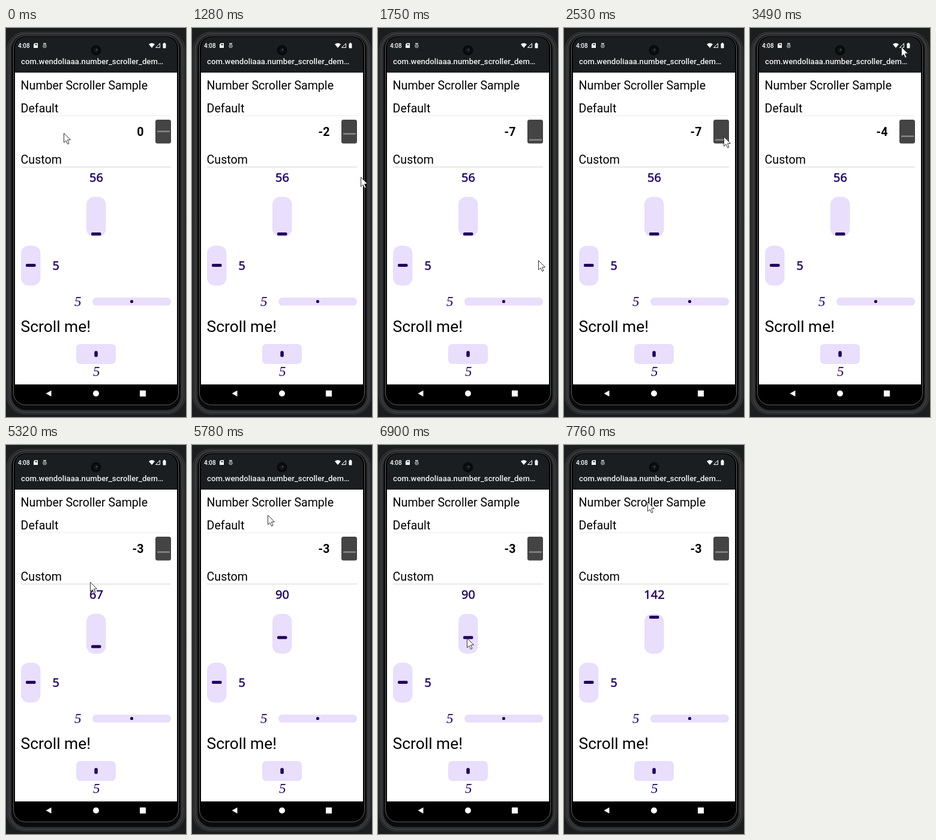
Write an HTML page with a canvas that moves like this. It is 300 px wide and 645 px high and loops after 8000 ms.

```html
<!DOCTYPE html>
<html lang="en">
<head>
<meta charset="utf-8">
<title>Number Scroller</title>
<style>
  html, body { margin: 0; width: 100%; height: 100%; overflow: hidden; background: #1c1d1e; }
  canvas { display: block; }
</style>
</head>
<body>
<canvas id="stage" width="300" height="645"></canvas>
<script>
const ctx = document.getElementById('stage').getContext('2d');
const LOOP = 8000;
const PURPLE = '#21005d', LILAC = '#e9defc', BAR = '#1b1e20';
const ROBOTO = 'Roboto, sans-serif';

// Pointer moves; `drag` names the value it changes and by how much.
const moves = [
  { start: 90, end: 470, steps: 6, from: [96, 174], to: [255, 164] },
  { start: 980, end: 1750, steps: 11, from: [255, 164], via: [303, 246], to: [267, 385], drag: ['plain', -7] },
  { start: 2070, end: 2530, steps: 7, from: [267, 385], to: [266, 180] },
  { start: 2950, end: 3570, steps: 9, from: [266, 180], to: [251, 21], drag: ['plain', 4] },
  { start: 3890, end: 3980, steps: 2, from: [251, 21], to: [186, 222] },
  { start: 4220, end: 4600, steps: 6, from: [186, 222], to: [148, 292] },
  { start: 5090, end: 5780, steps: 10, from: [148, 292], to: [126, 116], drag: ['custom', 34] },
  { start: 6100, end: 6500, steps: 6, from: [126, 116], to: [148, 332] },
  { start: 6900, end: 7690, steps: 11, from: [148, 332], to: [138, 93], drag: ['custom', 52] },
  { start: 7760, end: 7760, steps: 1, from: [138, 93], to: [139, 94] }
];

const ease = p => 0.3 * (1 - Math.cos(Math.PI * p)) + 0.4 * p;

function along({ from, via, to }, s) {
  return from.map((a, i) => {
    const mid = via ? via[i] : (a + to[i]) / 2;
    return (1 - s) ** 2 * a + 2 * s * (1 - s) * mid + s * s * to[i];
  });
}

function stateAt(t) {
  const state = { pointer: moves[0].from, plain: 0, custom: 56 };
  for (const move of moves) {
    if (t < move.start) break;
    const interval = (move.end - move.start) / (move.steps - 1) || 1;
    // Steps land on a 10 ms clock, so allow a slightly early one.
    const step = Math.min(move.steps, Math.floor((t - move.start) / interval + 0.12) + 1);
    state.pointer = along(move, ease(step / move.steps));
    if (move.drag) {
      const [key, delta] = move.drag;
      const travel = (state.pointer[1] - move.from[1]) / (move.to[1] - move.from[1]);
      const amount = Math.max(0, (travel - 0.06) / 0.94);
      state[key] += Math.sign(delta) * Math.floor(Math.abs(delta) * amount + 1e-6);
    }
  }
  return state;
}

function box(x, y, w, h, r, color) {
  ctx.fillStyle = color;
  ctx.beginPath();
  ctx.roundRect(x, y, w, h, r);
  ctx.fill();
}

function disc(x, y, r, color) {
  ctx.fillStyle = color;
  ctx.beginPath();
  ctx.arc(x, y, r, 0, 2 * Math.PI);
  ctx.fill();
}

function poly(color, ...points) {
  ctx.fillStyle = color;
  ctx.beginPath();
  points.forEach(([x, y]) => ctx.lineTo(x, y));
  ctx.closePath();
  ctx.fill();
}

function outline(color, width = 1) {
  ctx.strokeStyle = color;
  ctx.lineWidth = width;
  ctx.stroke();
}

function label(text, x, y, font, color = '#000', align = 'left') {
  ctx.font = font;
  ctx.fillStyle = color;
  ctx.textAlign = align;
  ctx.fillText(text, x, y);
}

// Regular digits thickened to a medium weight.
function digits(value, x, y) {
  label(value, x, y, '20px "Noto Sans", sans-serif', PURPLE, 'center');
  ctx.strokeStyle = PURPLE;
  ctx.lineWidth = 0.5;
  ctx.strokeText(value, x, y);
}

function drawPhone() {
  box(0, 0, 300, 645, 0, '#1c1d1e');
  box(2, 7, 296, 633, 29, '#242526');
  outline('#3f4041');
  box(5, 9.5, 290, 628, 27, '#303132');
  outline('#4b4c4d');
  box(9, 11.5, 282, 622, 24, '#0b0b0b');
  box(12.5, 13, 275, 612, 20, '#000');
  outline('#5e5f60');
  box(15, 15, 270, 607, 18, '#000');
  box(15, 15, 270, 59, [18, 18, 0, 0], BAR);
  box(15, 74, 270, 517, 0, '#fff');
}

function drawStatusBar() {
  label('4:08', 20, 33, '500 10px ' + ROBOTO, '#fff');
  poly('#fff', [48, 25], [53, 25], [53, 33], [46, 33], [46, 27]);
  box(48.5, 26.5, 3, 2, 0, BAR);

  box(62, 25, 5, 1.5, 0, '#ddd');
  disc(64.5, 30, 2.7, BAR);
  outline('#ddd');
  disc(64.5, 30, 1, '#ddd');

  disc(150, 37, 8.5, '#090a0b');
  disc(150, 37, 4, '#14171a');
  disc(151, 36, 1.2, '#4a5054');

  poly('#fff', [238, 27], [240.5, 25.5], [243, 25], [245.5, 25.5], [248, 27], [243, 33]);
  poly(BAR, [256.5, 25.5], [256.5, 32.5], [249.5, 32.5]);
  outline('#fff');
  box(261.5, 25.5, 5, 8, 1, '#fff');
  box(263, 24.5, 2, 1.5, 0, '#fff');
  label('com.wendoliaaa.number_scroller_dem…', 25, 60, '500 13.2px ' + ROBOTO, '#f1f1f1');
}

function drawNavigation() {
  poly('#fff', [66.5, 606], [75.5, 601], [75.5, 611]);
  disc(150, 606, 5, '#fff');
  box(223, 601, 10, 10, 0.5, '#fff');
}

function drawContent({ plain, custom }) {
  const heading = '19.6px ' + ROBOTO;
  const italic = 'italic 23px "Liberation Serif", serif';

  label('Number Scroller Sample', 24.6, 102, heading);
  label('Default', 24.6, 140, heading);
  box(25, 145, 250, 1, 0, '#ebebeb');
  label(plain, 229.5, 179, 'bold 19.7px ' + ROBOTO, '#000', 'right');
  box(249, 152, 26, 39.5, 3.5, '#444');
  box(252, 170.2 - 2 * plain, 21, 2.5, 0.5, '#888');

  label('Custom', 24.6, 225, heading);
  box(25, 230, 250, 1, 0, '#d5d5d5');
  digits(custom, 150.5, 255);
  box(134, 280, 32.5, 66, 13, LILAC);
  box(142, 339 - (custom - 56) * 0.651, 16.5, 5, 1.8, PURPLE);

  box(25, 361, 32.5, 66, 13, LILAC);
  box(33, 391, 16.5, 5, 1.8, PURPLE);
  digits(5, 83.2, 401);

  label('5', 114, 460.5, italic, PURPLE);
  box(144, 447, 131, 13.3, 6.5, LILAC);
  box(207, 451, 5, 5, 1.8, PURPLE);

  label('Scroll me!', 24.5, 504, '26.4px ' + ROBOTO);
  box(117, 524, 66, 33, 6.5, LILAC);
  box(147.3, 535.6, 5.6, 10, 2.4, PURPLE);
  label('5', 145, 576.5, italic, PURPLE);
}

function drawPointer([x, y]) {
  ctx.save();
  ctx.translate(Math.round(x), Math.round(y));
  poly('#fff', [0.5, 0.5], [0.5, 16], [4, 12.8], [6.6, 18.5], [9, 17.4], [6.5, 11.8], [11.4, 11.4]);
  outline('#333');
  ctx.restore();
}

function render() {
  const state = stateAt(performance.now() % LOOP);
  drawPhone();
  drawStatusBar();
  drawNavigation();
  drawContent(state);
  drawPointer(state.pointer);
  requestAnimationFrame(render);
}
render();
</script>
</body>
</html>
```
